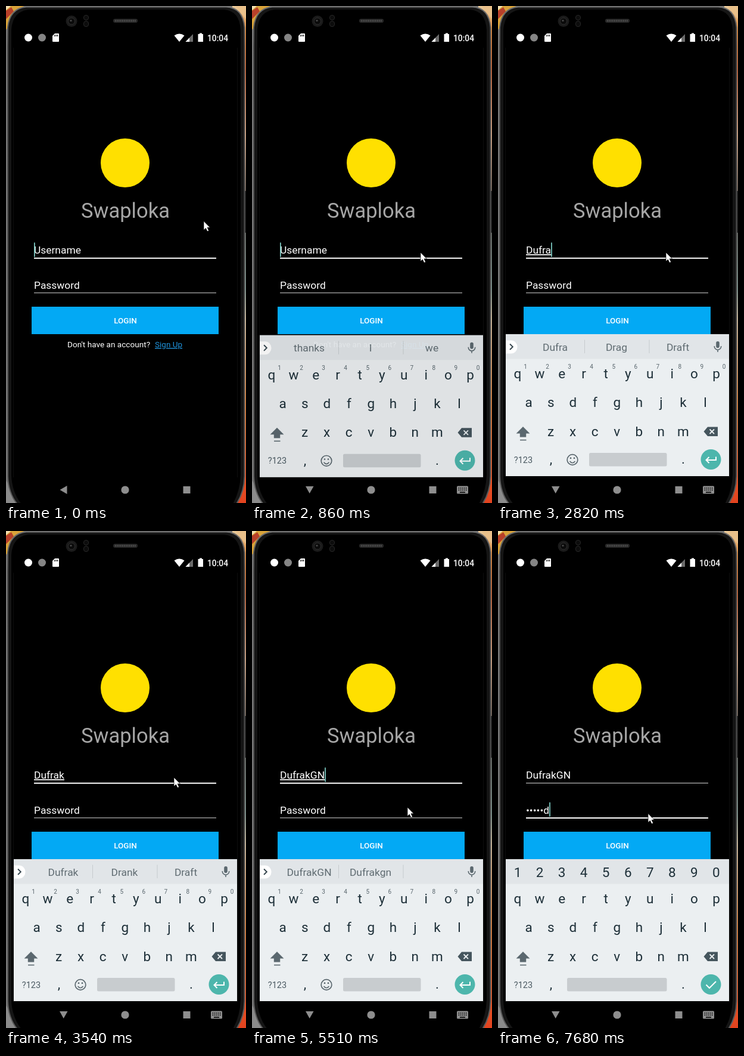
Animation of 403 by 833 pixels, one loop 8 s. Source, as an HTML page:

```html
<!DOCTYPE html>
<html lang="en">
<head>
<meta charset="utf-8">
<title>Login</title>
<style>
  html, body { margin: 0; width: 100%; height: 100%; overflow: hidden; background: #000; }
  svg { display: block; width: 100%; height: 100%; font-family: Roboto, sans-serif; }
  .mid { text-anchor: middle; }
  .field { font-size: 17.4px; fill: #fff; }
  .composing { text-decoration: underline 1px; }
  .key { font-size: 22.5px; fill: #1d2f38; }
  .sup { font-size: 10px; fill: #58656c; }
  .pick { font-size: 17.4px; fill: #606c72; }
  .nav { fill: #8e8e8e; }
  .icon { fill: #fff; }
</style>
</head>
<body>
<svg viewBox="0 0 403 833" preserveAspectRatio="none">
  <defs>
    <linearGradient id="wall" x2="0" y2="1">
      <stop offset="0" stop-color="#e8c99a"/>
      <stop offset=".05" stop-color="#e08a3c"/>
      <stop offset=".13" stop-color="#c8663a"/>
      <stop offset=".26" stop-color="#dcae8c"/>
      <stop offset=".4" stop-color="#55504c"/>
      <stop offset=".57" stop-color="#7f9690"/>
      <stop offset=".63" stop-color="#d9c4a4"/>
      <stop offset=".8" stop-color="#e0823a"/>
      <stop offset="1" stop-color="#e2431f"/>
    </linearGradient>
    <linearGradient id="rim" x2="0" y2="1">
      <stop offset="0" stop-color="#6e6e6e"/>
      <stop offset=".08" stop-color="#4a4a4a"/>
      <stop offset="1" stop-color="#5c5c5c"/>
    </linearGradient>
  </defs>

  <!-- Wallpaper slivers -->
  <rect width="403" height="833" fill="#777"/>
  <rect x="380" width="23" height="833" fill="url(#wall)"/>
  <path d="M0 0H30L0 40Z" fill="#d9a33a"/>
  <path d="M0 8L9 2L13 9L0 22Z" fill="#b8402a"/>
  <path d="M0 0H8L0 7Z" fill="#f3dfb0"/>
  <path d="M386 0H403V22Z" fill="#e9c08a"/>
  <path d="M0 795L24 833H0Z" fill="#8b8b8b"/>

  <!-- Phone -->
  <rect x="399" y="310" width="4" height="70" fill="#1b1b1b"/>
  <path d="M34 1.5H370Q398 3 400.5 36V788Q400 816 386 836H20Q4 818 3 788V36Q6 4 34 1.5Z" fill="#151515" stroke="url(#rim)" stroke-width="2"/>
  <path d="M38 6H366Q392 8 394 40V786Q393 814 380 836H27Q10 816 9 786V40Q11 9 38 6Z" fill="#000"/>
  <path d="M12.5 70V790M388.5 70V790" stroke="#0d0d0d"/>
  <circle cx="110" cy="25.5" r="9.5" fill="#1b1b1b"/>
  <circle cx="110" cy="25.5" r="5.5" fill="#0b0b0b" stroke="#303030"/>
  <circle cx="109" cy="24.5" r="1.6" fill="#484848"/>
  <g fill="#0c0c0c" stroke="#272727">
    <rect x="130.5" y="15.5" width="8" height="8" rx="3.5"/>
    <rect x="130.5" y="25.5" width="8" height="9" rx="3.5"/>
  </g>
  <rect x="180" y="21.5" width="41" height="6.5" rx="3" fill="#292929"/>
  <path d="M183 24.8H219" stroke="#565656" stroke-width="3" stroke-dasharray="1.5 1.5"/>

  <!-- Status bar -->
  <g class="icon">
    <circle cx="37.5" cy="53" r="6.5"/>
    <circle cx="60.5" cy="53" r="6.5" fill="#858585"/>
    <path d="M82 46H88Q89 46 89 47V59Q89 60 88 60H79Q78 60 78 59V50Z"/>
    <path d="M81.5 51V48.5M84 51V48M86.5 51V48" stroke="#000" stroke-width="1.2"/>
    <path d="M282.5 49.5Q291 43.5 299.5 49.5L291 60Z"/>
    <path d="M314 47V60H301.5Z" fill="#6b6b6b"/>
    <path d="M308 53.2V60H301.5Z"/>
    <path d="M325 45.5H329V47H331V60H322.5V47H325Z"/>
    <text x="338" y="58.5" font-size="13.8" font-weight="500">10:04</text>
  </g>

  <!-- Login form -->
  <circle cx="200" cy="263" r="41" fill="#ffe000"/>
  <text class="mid" x="200.5" y="355" font-size="34.5" fill="#a6a6a6">Swaploka</text>
  <text class="field" id="user" x="47" y="415"></text>
  <text class="field" id="pass" x="47" y="473.5"></text>
  <rect id="userLine" x="47" width="306" fill="#fff"/>
  <rect id="passLine" x="47" width="306" fill="#fff"/>
  <rect id="caret" width="1.7" height="24" fill="#7fd0c8"/>
  <rect x="43" y="504" width="314" height="46" fill="#03a9f4"/>
  <text class="mid icon" x="200.5" y="532" font-size="13.4" font-weight="500">LOGIN</text>
  <text class="icon" x="103" y="572" font-size="13.6">Don't have an account?</text>
  <text x="250" y="572" font-size="13.5" fill="#1f93dc" text-decoration="underline">Sign Up</text>

  <!-- Keyboard -->
  <g id="board">
    <rect x="13" y="550" width="375" height="238" fill="#ebeff1"/>
    <rect x="13" y="550" width="375" height="41.5" fill="#e1e5e8"/>
    <g id="letters"></g>
    <g id="wordKeys">
      <path d="M13 560.5H22A10.5 11 0 0 1 22 582.5H13Z" fill="#fff"/>
      <path d="M20 566.5L24.8 571.2L20 576" fill="none" stroke="#37474f" stroke-width="1.9"/>
      <path d="M145.5 559.5V582M254 559.5V582" stroke="#c6cbce"/>
      <g id="picks"></g>
      <rect x="366.2" y="562" width="5.6" height="11" rx="2.8" fill="#5b686f"/>
      <path d="M363.3 570V570.5A5.7 5.7 0 0 0 374.7 570.5V570M369 576V580" fill="none" stroke="#5b686f" stroke-width="1.6"/>
      <g fill="none" stroke="#5b686f" stroke-width="1.7">
        <circle cx="125" cy="760.5" r="8.8"/>
        <path d="M120.5 763Q125 768.5 129.5 763"/>
      </g>
      <path d="M120.8 757.8H123.2M126.8 757.8H129.2" stroke="#5b686f" stroke-width="2.4"/>
    </g>
    <g id="digits"></g>
    <path d="M42 705L53.5 716.5H47.2V722.5H36.8V716.5H30.5Z" fill="#5b686f"/>
    <path d="M37 727.5H47.5" stroke="#5b686f" stroke-width="1.6"/>
    <path d="M352 705.5H369V721H352L345.5 713.2Z" fill="#45555d"/>
    <path d="M355.5 709.5L363 717M363 709.5L355.5 717" stroke="#ebeff1" stroke-width="1.8"/>
    <text class="mid" x="42.5" y="765.5" font-size="14.5" fill="#4b5a62">?123</text>
    <rect id="space" y="749" height="22.5" rx="2.5" fill="#c8cccf"/>
    <circle cx="357.5" cy="760" r="17" fill="#4db6ac"/>
    <path id="enter" fill="none" stroke="#fff" stroke-width="2"/>
  </g>

  <!-- Navigation bar -->
  <path class="nav" id="back"/>
  <circle class="nav" cx="200" cy="811" r="6.6"/>
  <rect class="nav" x="297.5" y="805" width="12" height="12"/>
  <g id="navKeys">
    <rect class="nav" x="344" y="804.5" width="19" height="13" rx="1.5"/>
    <path d="M346.5 808H361M346.5 811.2H361" stroke="#000" stroke-width="1.6" stroke-dasharray="1.7 1.4"/>
    <path d="M349 815H358" stroke="#000" stroke-width="1.6"/>
  </g>

  <path id="mouse" d="M0 0V15L3.4 11.9L6 17.3L8.6 16.2L6.1 10.8H10.6Z" fill="#fff" stroke="#000" stroke-width=".7"/>
</svg>
<script>
const LOOP = 8000;
const $ = id => document.getElementById(id);
const set = (id, attrs) => {
  for (const k in attrs) $(id).setAttribute(k, attrs[k]);
};
const show = (id, on) => $(id).style.display = on ? '' : 'none';

function addText(parent, cls, x, y, s) {
  const el = document.createElementNS('http://www.w3.org/2000/svg', 'text');
  el.setAttribute('class', cls);
  el.setAttribute('x', x);
  el.setAttribute('y', y);
  el.textContent = s;
  $(parent).append(el);
  return el;
}

const PITCH = 37.05;
function keyRow(parent, keys, x, y) {
  [...keys].forEach((k, i) => addText(parent, 'key mid', x + i * PITCH, y, k));
}
keyRow('letters', 'qwertyuiop', 33, 624);
keyRow('letters', 'asdfghjkl', 51.7, 672);
keyRow('letters', 'zxcvbnm', 88.5, 720.5);
keyRow('letters', ',', 89, 767);
keyRow('letters', '.', 311, 767);
keyRow('digits', '1234567890', 33, 580);
[...'1234567890'].forEach((d, i) => addText('wordKeys', 'sup mid', 46 + i * PITCH, 608, d));
const picks = [96, 199, 302].map(x => addText('picks', 'pick mid', x, 577.5, ''));

// Each step lists only what changes at its time.
const steps = [
  [0, { mouse: [332, 360.5], user: '', pass: '', caret: 1, focus: 'user', board: 0, nav: 0, lock: 0, words: 'thanks I we' }],
  [150, { mouse: [311, 384] }],
  [270, { mouse: [283, 413], caret: 0 }],
  [720, { nav: 1 }],
  [860, { board: .95, caret: 1 }],
  [990, { board: 1 }],
  [1290, { caret: 0 }],
  [1690, { mouse: [282, 413], caret: 1 }],
  [2250, { user: 'D', words: 'D Do Did' }],
  [2400, { user: 'Du', words: 'Du Due Dude' }],
  [2550, { user: 'Duf', words: 'Duf Dug Duffel' }],
  [2700, { user: 'Dufr', words: 'Dufr Dirt Drift' }],
  [2820, { user: 'Dufra', words: 'Dufra Drag Draft' }],
  [3080, { user: 'Dufrak', words: 'Dufrak Drank Draft' }],
  [3540, { caret: 0 }],
  [3960, { user: 'DufrakG', caret: 1, words: 'DufrakG Dufrakg Draft' }],
  [4520, { user: 'DufrakGN', words: 'DufrakGN Dufrakgn' }],
  [4950, { caret: 0 }],
  [5230, { mouse: [278, 429] }],
  [5360, { mouse: [270, 448] }],
  [5510, { mouse: [261, 463], caret: 1 }],
  [5790, { mouse: [252, 473.5], focus: 'pass' }],
  [5910, { lock: 1 }],
  [6490, { caret: 0 }],
  [6930, { pass: 'p', caret: 1 }],
  [7080, { pass: '•u' }],
  [7230, { pass: '••n' }],
  [7380, { pass: '•••r' }],
  [7530, { pass: '••••o' }],
  [7680, { pass: '•••••d' }]
];

function line(id, y, focused) {
  set(id, focused ? { y: y - .3, height: 2, opacity: 1 } : { y, height: 1, opacity: .85 });
}

function render(s) {
  const onUser = s.focus === 'user';
  $('user').textContent = s.user || 'Username';
  $('pass').textContent = s.pass || 'Password';
  $('user').classList.toggle('composing', onUser && s.user !== '');
  line('userLine', 422, onUser);
  line('passLine', 480.3, !onUser);

  const width = s[s.focus] ? $(s.focus).getComputedTextLength() : 0;
  set('caret', { x: 47 + width, y: onUser ? 396.5 : 454.8 });
  show('caret', s.caret);

  show('board', s.board);
  set('board', { opacity: s.board, transform: `translate(0 ${s.board < 1 ? 1.8 : 0})` });
  show('wordKeys', !s.lock);
  show('digits', s.lock);
  set('space', s.lock ? { x: 116, width: 167.5 } : { x: 153, width: 130.5 });
  set('enter', { d: s.lock ? 'M349.5 760.5L355 766L366 755' : 'M366 755.5V761H350M354.5 756L349.5 761L354.5 766' });
  const words = s.words.split(' ');
  picks.forEach((el, i) => {
    el.textContent = words[i] || '';
    el.style.fontWeight = words[i] === 'Do' ? 700 : 400;
  });

  set('back', { d: s.nav ? 'M90 805H103.5L96.7 817Z' : 'M102.5 804V818L90.5 811Z' });
  show('navKeys', s.nav);
  set('mouse', { transform: `translate(${s.mouse})` });
}

let shown = -1;
function frame() {
  const t = performance.now() % LOOP;
  const past = steps.filter(([at]) => at <= t);
  if (past.length !== shown) {
    shown = past.length;
    render(Object.assign({}, ...past.map(p => p[1])));
  }
  requestAnimationFrame(frame);
}
frame();
</script>
</body>
</html>
```
